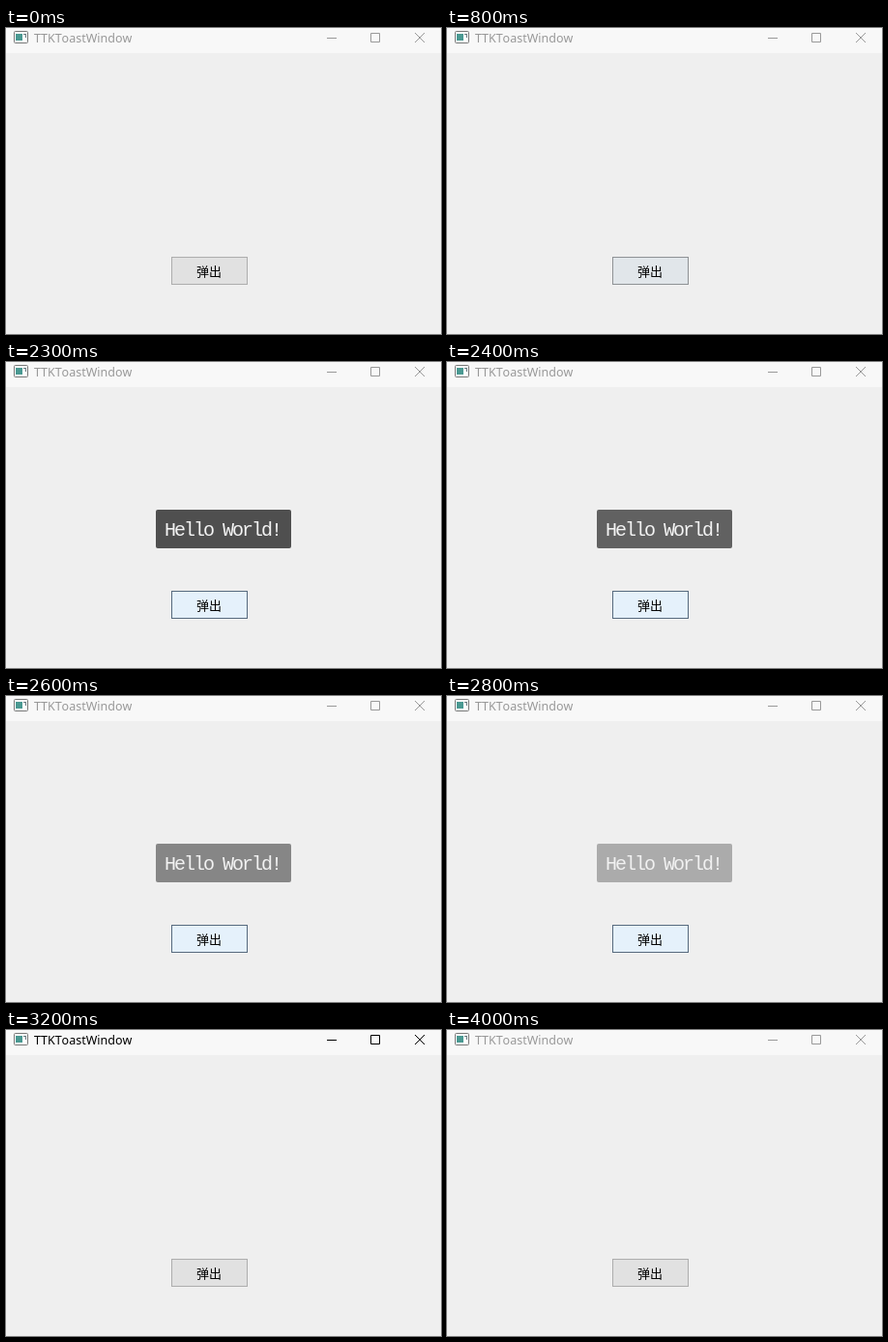
An HTML page that plays this animation: 450x317 px, repeating every 4100 ms.

```html
<!DOCTYPE html>
<html lang="zh">
<head>
<meta charset="utf-8">
<title>TTKToastWindow</title>
<style>
  html, body { margin: 0; width: 100%; height: 100%; overflow: hidden; background: #efefef; }
  svg { display: block; width: 450px; height: 317px; }
  .title { font: 12.5px "Noto Sans", sans-serif; font-kerning: none; }
  .label { font: 13px "Noto Sans CJK SC", "Noto Sans CJK", sans-serif; }
  .message { font: 20px "Liberation Mono", monospace; letter-spacing: -2px; }
</style>
</head>
<body>
<svg viewBox="0 0 450 317">
  <rect width="450" height="317" fill="#efefef"/>
  <rect width="450" height="26" fill="#f8f8f8"/>

  <g id="icon">
    <rect x="8.5" y="3.5" width="14" height="12" rx="1" fill="#fff" stroke="#777"/>
    <rect x="10" y="6" width="7" height="7" fill="#4a9992"/>
    <path d="M18 6.5h3M20.5 6v4" stroke="#687a80" fill="none"/>
  </g>

  <g id="caption">
    <text class="title" x="29" y="15" fill="currentColor">TTKToastWindow</text>
    <path d="M332 10.5h10M377.5 5.5h9v9h-9zM423 5l10 10M433 5l-10 10" fill="none" stroke="currentColor"/>
  </g>

  <rect id="button" x="171.5" y="237.5" width="78" height="28"/>
  <text class="label" x="197" y="257">弹出</text>

  <g id="toast">
    <rect x="155" y="153" width="140" height="40" rx="2" fill="#484848"/>
    <text class="message" x="164" y="180" fill="#f4f4f4">Hello World!</text>
  </g>
</svg>
<script>
  const LOOP = 4100, STEP = 100;
  const [caption, button, toast] = ["caption", "button", "toast"].map(id => document.getElementById(id));

  // Button look from each start time: [ms, fill, border]
  const buttonStates = [
    [0, "#e1e1e1", "#adadad"],
    [800, "#e1e6ea", "#8e9295"],
    [900, "#e3ecf3", "#707b86"],
    [1000, "#e5f1fb", "#566a7e"],
    [1300, "#cce4f7", "#3b5876"],
    [1400, "#deecf9", "#4a6280"],
    [2300, "#e5f1fb", "#566a7e"],
    [2900, "#e3ecf3", "#778089"],
    [3000, "#e1e5e8", "#96999b"],
    [3100, "#e1e1e1", "#adadad"]
  ];

  function toastOpacity(t) {
    if (t < 1400) return 0;
    if (t < 2300) return 1;
    return Math.max(0, (3165 - t) / 905);
  }

  function draw(t) {
    const active = (t >= 1300 && t < 1400) || (t >= 3200 && t < 4000);
    caption.setAttribute("color", active ? "#000" : "#999");

    const [, fill, border] = buttonStates.findLast(([start]) => t >= start);
    button.setAttribute("fill", fill);
    button.setAttribute("stroke", border);

    toast.setAttribute("opacity", toastOpacity(t));
  }

  const begin = performance.now();
  function tick() {
    const t = (performance.now() - begin) % LOOP;
    draw(Math.floor(t / STEP) * STEP);
    requestAnimationFrame(tick);
  }
  tick();
</script>
</body>
</html>
```
